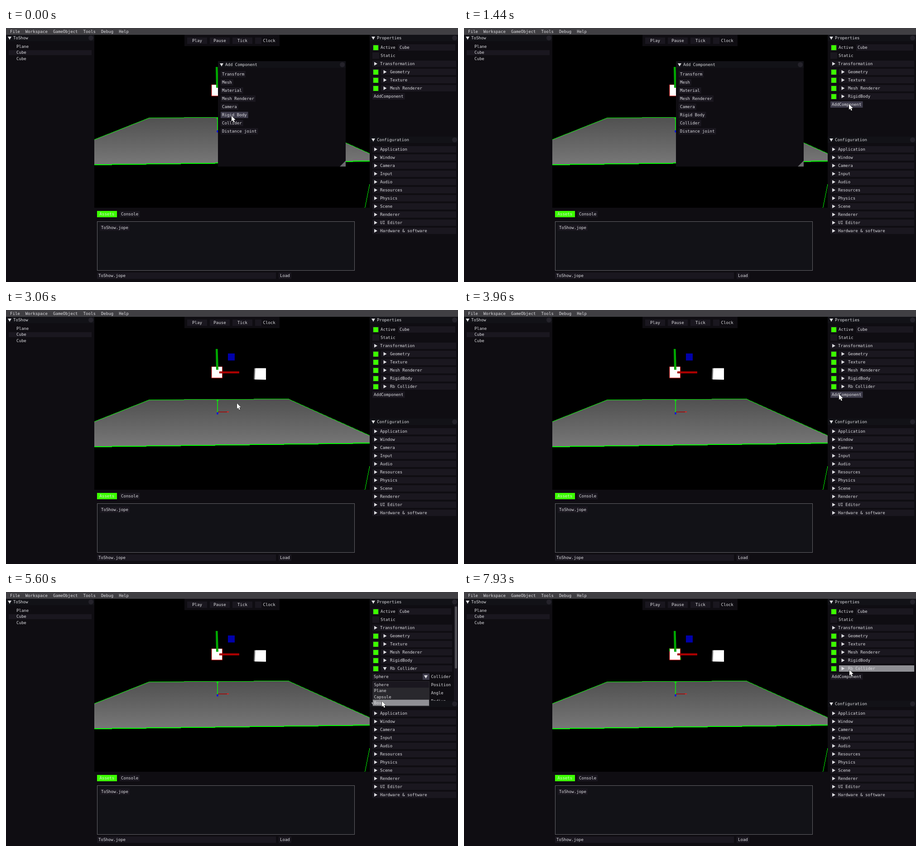
An HTML page with a canvas that plays this animation: 998 px wide and 561 px high, repeating every 8 s.

```html
<!DOCTYPE html>
<html lang="en">
<head>
<meta charset="utf-8">
<title>Scene editor</title>
<style>
html, body { margin: 0; width: 100%; height: 100%; overflow: hidden; background: #0f0d12; }
canvas { display: block; }
</style>
</head>
<body>
<canvas id="stage" width="998" height="561"></canvas>
<script>
const ctx = document.getElementById('stage').getContext('2d');
const LOOP = 8000, GLIDE = 500, CHAR = 5.46, ROW = 18, ITEM = 13.3;
const BG = '#0f0d12', FRAME = '#1a171f', TITLE = '#121217', HOVER = '#3d3b4a', HEADER_HOVER = '#8f8f94';
const TEXT = '#dedee2', GREEN = '#3cff00', WIRE = '#00ff00';

// The pointer glides to each stop; `set` is what its click changes there.
const stops = [
  { at: 0, x: 498, y: 194, set: { popup: true, scroll: 0 } },
  { at: 300, x: 498, y: 194, set: { popup: false, rigid: true } },
  { at: 800, x: 868, y: 159 },
  { at: 1300, x: 850, y: 168, set: { popup: true } },
  { at: 2340, x: 521, y: 203 },
  { at: 2850, x: 510, y: 206, set: { popup: false, collider: true } },
  { at: 3960, x: 828, y: 186 },
  { at: 4550, x: 846, y: 170, set: { open: true } },
  { at: 4900, x: 850, y: 187, set: { list: true } },
  { at: 5600, x: 830, y: 241 },
  { at: 5690, x: 830, y: 241, set: { list: false, boxed: true } },
  { at: 6250, x: 841, y: 215, set: { scroll: 51 } },
  { at: 6600, x: 845, y: 205 },
  { at: 7050, x: 846, y: 205, set: { scroll: 0 } },
  { at: 7450, x: 852, y: 170, set: { open: false } },
  { at: 7650, x: 854, y: 154 },
  { at: 7930, x: 851, y: 172 }
];

let mouse, hoverable;

function stateAt(t) {
  return Object.assign({}, ...stops.filter(stop => stop.at <= t).map(stop => stop.set));
}

function pointerAt(t) {
  const i = stops.findIndex(stop => stop.at > t);
  if (i < 0) return stops.at(-1);
  const from = stops[i - 1], to = stops[i];
  const start = Math.max(from.at, to.at - GLIDE);
  const k = Math.max(0, (t - start) / (to.at - start));
  const ease = k * k * (3 - 2 * k);
  return { x: from.x + (to.x - from.x) * ease, y: from.y + (to.y - from.y) * ease };
}

function rect(x, y, right, bottom, color) {
  ctx.fillStyle = color;
  ctx.fillRect(x, y, right - x, bottom - y);
}
function trace(points) {
  ctx.beginPath();
  points.forEach(p => ctx.lineTo(...p));
}
function poly(color, ...points) {
  trace(points);
  ctx.fillStyle = color;
  ctx.fill();
}
function line(color, width, ...points) {
  trace(points);
  ctx.strokeStyle = color;
  ctx.lineWidth = width;
  ctx.stroke();
}
// Unsmoothed wire between two points.
function wire(x0, y0, x1, y1, thick = 1) {
  const n = Math.max(Math.abs(x1 - x0), Math.abs(y1 - y0));
  ctx.fillStyle = WIRE;
  for (let i = 0; i <= n; i++) {
    const x = Math.round(x0 + (x1 - x0) * i / n), y = Math.round(y0 + (y1 - y0) * i / n);
    ctx.fillRect(x, y, 1, thick);
  }
}
function clipped(x, y, w, h, paint) {
  ctx.save();
  ctx.beginPath();
  ctx.rect(x, y, w, h);
  ctx.clip();
  paint();
  ctx.restore();
}
function text(s, x, cy) {
  ctx.fillStyle = TEXT;
  ctx.fillText(s, x, cy + 3);
}
function over(x, y, right, bottom) {
  return hoverable && mouse.x >= x && mouse.x < right && mouse.y >= y && mouse.y < bottom;
}
function arrow(x, cy, down) {
  if (down) poly(TEXT, [x - 4, cy - 3], [x + 4, cy - 3], [x, cy + 4]);
  else poly(TEXT, [x - 3, cy - 4], [x + 4, cy], [x - 3, cy + 4]);
}
function frame(x, right, cy, hover = FRAME) {
  const box = [x, cy - 7, right, cy + 7];
  rect(...box, over(...box) ? hover : FRAME);
}
function button(s, x, cy, right = x + s.length * CHAR + 6) {
  frame(x, right, cy, HOVER);
  text(s, x + 3, cy);
}
function field(s, x, right, cy) {
  frame(x, right, cy);
  text(s, x + 3, cy);
}
function header(s, x, right, cy, textX, open) {
  frame(x, right, cy, HEADER_HOVER);
  arrow(x + 7 + (textX - x - 17) * 0.5, cy, open);
  text(s, textX, cy);
}
function check(cy, on) {
  frame(809, 824, cy);
  if (on) rect(811, cy - 5, 822, cy + 6, GREEN);
}
function titleBar(s, x, right, cy) {
  rect(x, cy - 7, right, cy + 7, TITLE);
  arrow(x + 8, cy, true);
  text(s, x + 16, cy);
  ctx.beginPath();
  ctx.arc(right - 7.5, cy, 5.5, 0, 7);
  ctx.fillStyle = '#24222a';
  ctx.fill();
}

function drawPlane() {
  const shade = ctx.createLinearGradient(0, 197, 0, 300);
  shade.addColorStop(0, '#505050');
  shade.addColorStop(1, '#777');
  poly(shade, [195, 246], [316, 198], [623, 196.5], [803, 277], [803, 295], [195, 302]);
  wire(195, 246, 316, 198);
  wire(316, 198, 623, 196);
  wire(316, 198, 340, 198);
  wire(466, 197, 494, 197);
  wire(623, 196, 803, 277);
  wire(195, 301, 803, 293, 2);
  wire(803, 342, 792, 397);
}

function drawAxes() {
  line(WIRE, 1.5, [467, 198], [467, 226]);
  line(WIRE, 1.5, [464.5, 200], [469.5, 200]);
  rect(468, 224.5, 488, 226, '#a00');
  rect(488, 224, 492, 226, '#e02020');
  rect(465.5, 226, 468.5, 230.5, '#00f');
}

function drawCubes(boxed) {
  rect(453.5, 125, 478, 150.5, '#f22');
  rect(454.5, 125.5, 477, 149.5, '#fff');
  if (boxed) {
    line('#6a9a20', 1.2, [453, 125], [478, 125]);
    rect(453, 125, 454.5, 131, '#00c800');
    rect(477.5, 144, 479, 150, '#00c800');
  }
  poly('#777', [548, 128.5], [551, 129], [550, 153.5], [547, 153]);
  poly('#fff', [550.5, 128.5], [574, 128.5], [574, 154], [549.5, 153.5]);
  poly('#0a0', [463, 86], [467.5, 86], [469, 132], [464, 132]);
  rect(471, 135.5, 515, 140, '#a00');
  rect(490, 96, 505, 111.5, '#0000aa');
}

function drawToolbar() {
  rect(394, 15, 604, 40, BG);
  ['Play', 'Pause', 'Tick'].forEach((s, i) => {
    const x = 400 + i * 50;
    frame(x, x + 44, 28);
    text(s, x + 22 - s.length * CHAR / 2, 28);
  });
  frame(550, 564, 28);
  text('Clock', 567.5, 28);
}

function drawFixedPanels() {
  rect(0, 0, 998, 561, BG);
  rect(0, 0, 998, 15, '#403f43');
  let x = 9;
  for (const s of ['File', 'Workspace', 'GameObject', 'Tools', 'Debug', 'Help']) {
    text(s, x, 8);
    x += s.length * CHAR + 12;
  }
  titleBar('ToShow', 0, 195, 22);
  rect(6, 49, 189, 60, FRAME);
  ['Plane', 'Cube', 'Cube'].forEach((s, i) => text(s, 23, 41 + i * ITEM));

  rect(201, 404, 245, 418, GREEN);
  text('Assets', 206.5, 411);
  button('Console', 251, 411);
  rect(201, 427, 770, 536, '#66656a');
  rect(202, 428, 769, 535, TITLE);
  button('ToShow.jope', 207, 441);
  field('ToShow.jope', 201, 596, 547);
  button('Load', 602, 547);
}

function drawConfig() {
  rect(803, 240, 998, 561, BG);
  titleBar('Configuration', 803, 998, 247);
  ['Application', 'Window', 'Camera', 'Input', 'Audio', 'Resources', 'Physics', 'Scene',
    'Renderer', 'UI Editor', 'Hardware & software']
    .forEach((s, i) => header(s, 809, 994, 268 + i * ROW, 826));
}

function drawNumbers(label, value, count, cy) {
  const pitch = 130 / count;
  for (let i = 0; i < count; i++) {
    const x = Math.floor(809 + i * pitch);
    field(value, x, Math.floor(x + pitch - 4), cy);
  }
  text(label, 938.5, cy);
}

function drawCollider(y, { boxed, list }) {
  frame(809, 935, y);
  if (list || over(809, y - 7, 935, y + 7)) rect(920, y - 7, 935, y + 7, HOVER);
  text(boxed ? 'Box' : 'Sphere', 812, y);
  arrow(927, y, true);
  text('Collider', 938.5, y);
  drawNumbers('Position', '0.00', 3, y + ROW);
  drawNumbers('Angle', '0.00', 3, y + 2 * ROW);
  drawNumbers(boxed ? 'Size' : 'Radius', '1.00', boxed ? 3 : 1, y + 3 * ROW);
  clipped(809, y + 60, 78.5, 24, () => button('Size From AABB', 809, y + 4 * ROW));
  text('Friction: Static/Dynamic', 809, y + 88);
  drawNumbers('', '0.50', 2, y + 104);
}

function drawScrollbar(scroll) {
  rect(989, 29, 998, 240, FRAME);
  ctx.beginPath();
  ctx.roundRect(991, 32 + scroll * 0.61, 5, 137, 2);
  ctx.fillStyle = '#515056';
  ctx.fill();
}

function drawProperties(state) {
  const right = state.open ? 985 : 994;
  let y = 43 - state.scroll;
  check(y, true);
  text('Active', 827, y);
  field('Cube', 866, right - 2, y);
  check(y += ROW, false);
  text('Static', 827, y);
  header('Transformation', 809, right, y += ROW, 826);
  const parts = ['Geometry', 'Texture', 'Mesh Renderer'];
  if (state.rigid) parts.push('RigidBody');
  if (state.collider) parts.push('Rb Collider');
  for (const part of parts) {
    check(y += ROW, true);
    header(part, 828, right, y, 848, state.open && part === 'Rb Collider');
  }
  y += ROW;
  if (state.open) {
    drawCollider(y, state);
    drawScrollbar(state.scroll);
  } else {
    button('AddComponent', 809, y);
  }
}

function drawList() {
  rect(809.5, 197, 935, 252.5, '#29282d');
  ['Sphere', 'Plane', 'Capsule', 'Box'].forEach((s, i) => {
    const cy = 205 + i * ITEM, box = [810, cy - 7, 934, cy + 6.3];
    if (over(...box)) rect(...box, HEADER_HOVER);
    else if (i === 0) rect(...box, FRAME);
    text(s, 812.5, cy);
  });
}

function drawPopup() {
  rect(468, 73, 750, 306, BG);
  titleBar('Add Component', 468, 750, 81);
  ['Transform', 'Mesh', 'Material', 'Mesh Renderer', 'Camera', 'Rigid Body', 'Collider', 'Distance joint']
    .forEach((s, i) => button(s, 474, 102 + i * ROW));
  poly('#69686c', [750, 293], [750, 306], [737, 306]);
}

function drawPointer({ x, y }) {
  const shape = [[0, 0], [0, 12.5], [2.8, 9.8], [4.8, 14.5], [7, 13.5], [5, 9], [8.8, 9], [0, 0]]
    .map(([dx, dy]) => [x + dx, y + dy]);
  line('#000', 1, ...shape);
  poly('#fff', ...shape);
}

function draw(t) {
  const state = stateAt(t);
  mouse = pointerAt(t);
  hoverable = !state.list;
  ctx.font = '9.07px "DejaVu Sans Mono", monospace';
  drawFixedPanels();
  rect(195, 15, 803, 397, '#000');
  clipped(195, 15, 608, 382, () => {
    drawPlane();
    drawAxes();
    drawCubes(state.boxed);
    drawToolbar();
  });
  clipped(803, 29, 195, 211, () => drawProperties(state));
  titleBar('Properties', 803, 998, 22);
  drawConfig();
  hoverable = true;
  if (state.list) drawList();
  if (state.popup) drawPopup();
  drawPointer(mouse);
}

const began = performance.now();
function tick() {
  draw((performance.now() - began) % LOOP);
  requestAnimationFrame(tick);
}
tick();
</script>
</body>
</html>
```
